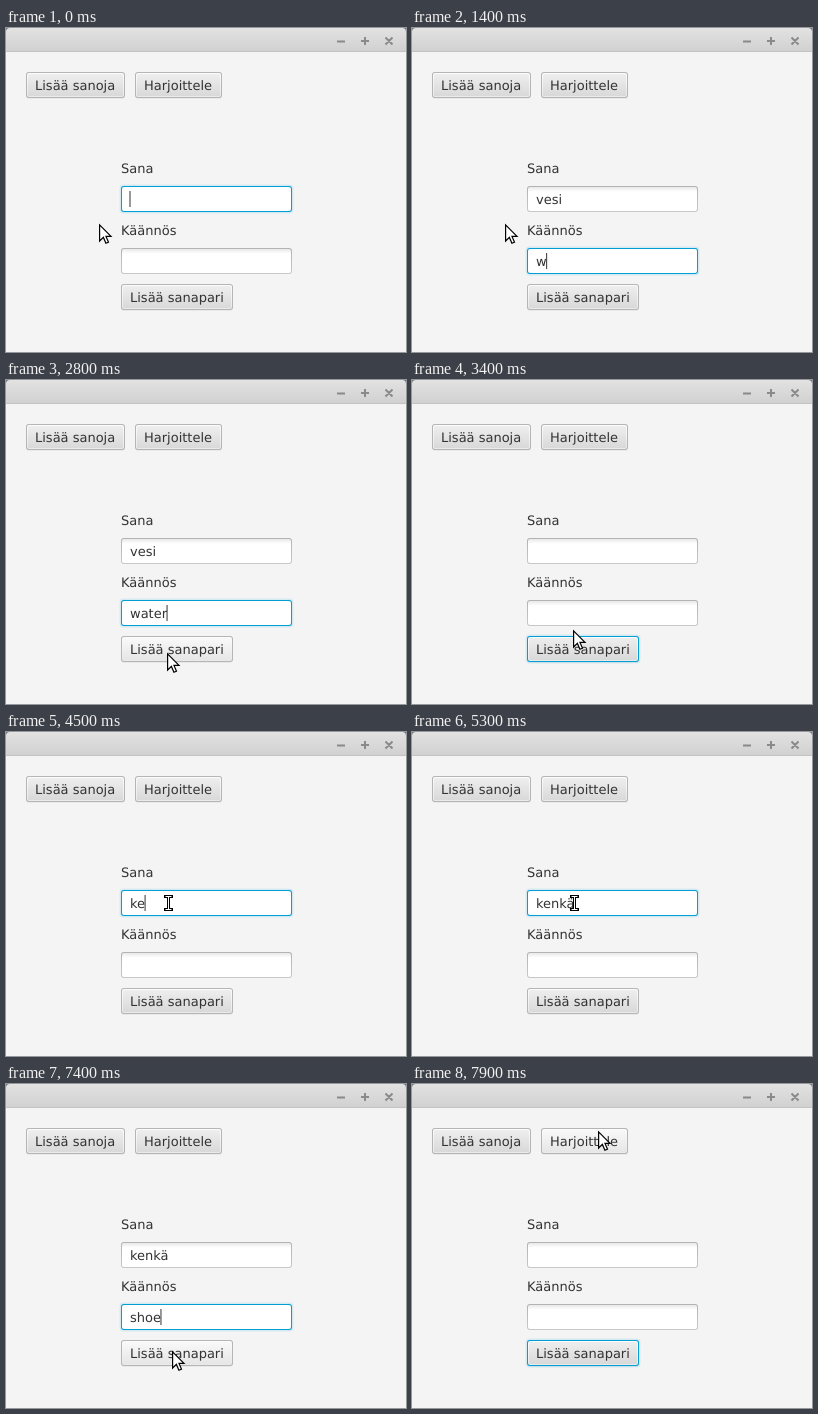
Recreate the animation shown at these times as an HTML page. Size 400 by 324 pixels, loop 8 s.

```html
<!DOCTYPE html>
<html lang="fi">
<head>
<meta charset="utf-8">
<title>Sanasto</title>
<style>
  html, body { margin: 0; width: 400px; height: 324px; overflow: hidden; background: #f4f4f4; }
  svg { display: block; }
  text { font: 13px "DejaVu Sans", sans-serif; fill: #333; text-rendering: geometricPrecision; white-space: pre; }
</style>
</head>
<body>
<svg id="stage" width="400" height="324" viewBox="0 0 400 324">
  <defs>
    <linearGradient id="bar" x2="0" y2="1"><stop stop-color="#e2e2e2"/><stop offset="1" stop-color="#d0d0d0"/></linearGradient>
    <linearGradient id="normal" x2="0" y2="1"><stop stop-color="#eee"/><stop offset="1" stop-color="#d9d9d9"/></linearGradient>
    <linearGradient id="hover" x2="0" y2="1"><stop stop-color="#f9f9f9"/><stop offset="1" stop-color="#e6e6e6"/></linearGradient>
    <linearGradient id="pressed" x2="0" y2="1"><stop stop-color="#dfdfdf"/><stop offset="1" stop-color="#cbcbcb"/></linearGradient>
    <linearGradient id="rim" x2="0" y2="1"><stop stop-color="#fcfcfc"/><stop offset="1" stop-color="#e9e9e9"/></linearGradient>
    <linearGradient id="edge" x2="0" y2="1"><stop stop-color="#b2b2b2"/><stop offset="1" stop-color="#c8c8c8"/></linearGradient>
    <linearGradient id="well" x2="0" y2="1"><stop stop-color="#e9e9e9"/><stop offset=".2" stop-color="#fff"/></linearGradient>
  </defs>
  <rect width="400" height="324" fill="#f4f4f4"/>
  <rect width="400" height="8" fill="#777"/>
  <path d="M0 24V4Q0 0 4 0H396Q400 0 400 4V24Z" fill="url(#bar)"/>
  <path d="M0 23.5H400" stroke="#c3c3c3"/>
  <path d="M331 13.5h8M355 13h8M359 9v8M379.5 9.5l7 7M386.5 9.5l-7 7" stroke="#8a8a8a" stroke-width="2"/>
</svg>
<script>
const stage = document.getElementById('stage');
const FOCUS = '#039ed3';
const LOOP = 8000;

function add(tag, attrs, parent = stage) {
  const el = document.createElementNS('http://www.w3.org/2000/svg', tag);
  set(el, attrs);
  parent.append(el);
  return el;
}

function set(el, attrs) {
  for (const name in attrs) el.setAttribute(name, attrs[name]);
}

function label(x, y, str) {
  const el = add('text', { x, y });
  el.textContent = str;
  return el;
}

// A rounded layer, inset from the control's bounds.
function layer({ x, y, w, h }, inset, rx, fill) {
  return add('rect', { x: x + inset, y: y + inset, width: w - 2 * inset, height: h - 2 * inset, rx, fill });
}

const inside = ({ x, y, w, h }, [px, py]) => px >= x && px < x + w && py >= y && py < y + h;

function button(x, y, w, str) {
  const box = { x, y, w, h: 26 };
  add('rect', { x, y: y + 1, width: w, height: 26, rx: 3, fill: '#e9e9e9' });
  const glow = layer(box, -1.4, 4, FOCUS);
  const edge = layer(box, 0, 3, '#b5b5b5');
  layer(box, 1, 2, 'url(#rim)');
  const body = layer(box, 2, 1.5, 'url(#normal)');
  label(x + 9, y + 18, str);
  return {
    draw(focused, at, down) {
      const over = inside(box, at);
      set(glow, { opacity: focused ? 0.13 : 0 });
      set(edge, { fill: focused ? FOCUS : '#b5b5b5' });
      set(body, { fill: `url(#${over ? (down ? 'pressed' : 'hover') : 'normal'})` });
    }
  };
}

function field(x, y) {
  const box = { x, y, w: 171, h: 26 };
  const glow = layer(box, -1.4, 4, FOCUS);
  const edge = layer(box, 0, 3, 'url(#edge)');
  const well = layer(box, 1, 2, 'url(#well)');
  const text = label(x + 9, y + 18, '');
  const caret = add('path', { stroke: '#333' });
  return {
    box,
    draw(str, focused, blink) {
      set(glow, { opacity: focused ? 0.13 : 0 });
      set(edge, { fill: focused ? FOCUS : 'url(#edge)' });
      set(well, { fill: focused ? '#fff' : 'url(#well)' });
      if (text.textContent !== str) text.textContent = str;
      const end = x + 9 + (str ? text.getComputedTextLength() : 0);
      set(caret, { d: `M${end} ${y + 5}v16`, opacity: focused && blink ? 1 : 0 });
    }
  };
}

const addWords = button(20, 44, 99, 'Lisää sanoja');
const practise = button(129, 44, 87, 'Harjoittele');
label(115, 145, 'Sana');
const word = field(115, 158);
label(115, 207, 'Käännös');
const meaning = field(115, 220);
const save = button(115, 256, 112, 'Lisää sanapari');

const arrow = add('path', {
  d: 'M.6 .9V17L4.4 13.4 6.9 19.3 9.5 18.2 7 12.4H12Z',
  fill: '#fff', stroke: '#000', 'stroke-width': 1.2
});
const beam = add('g', {});
const beamPath = 'M-3 -6.5H3M-3 6.5H3M0 -6.5V6.5';
add('path', { d: beamPath, stroke: '#000', 'stroke-width': 3, 'stroke-linecap': 'square' }, beam);
add('path', { d: beamPath, stroke: '#fff', 'stroke-width': 1 }, beam);

// Each step changes part of the state; "key" restarts the caret blink.
const steps = [];
const step = (t, change) => steps.push({ t, change });
const type = (name, str, times) =>
  times.forEach((t, i) => step(t, { [name]: str.slice(0, i + 1), key: t }));
const focus = (t, name) => step(t, { focus: name, key: t });
const move = (t, ...points) => points.forEach((at, i) => step(t + i * 100, { at }));

type('word', 'vesi', [400, 500, 600, 900]);
focus(1100, 'meaning');
type('meaning', 'water', [1400, 1500, 1600, 1700, 1800]);
move(1900, [152, 203], [225, 190], [267, 178]);
move(2300, [235, 250], [195, 291]);
move(2600, [178, 284], [165, 276], [161, 273]);
step(3100, { focus: 'save', down: true });
step(3200, { word: '', meaning: '', down: false });
move(3300, [161, 265], [161, 250], [162, 229], [162, 203], [162.5, 171]);
focus(3800, 'word');
type('word', 'kenkä', [4400, 4500, 5000, 5200, 5300]);
focus(5500, 'meaning');
type('meaning', 'shoe', [5800, 6000, 6100, 6400]);
move(6700, [168, 205], [176, 296], [182, 306]);
move(7100, [171, 290], [166, 267]);
step(7600, { focus: 'save', down: true });
step(7700, { word: '', meaning: '', down: false });
move(7800, [177, 150], [186, 47]);

const start = { word: '', meaning: '', focus: 'word', key: -400, at: [93, 196], down: false };

function draw(t) {
  const s = { ...start };
  for (const { t: from, change } of steps) if (from <= t) Object.assign(s, change);

  const blink = Math.floor((t - s.key) / 500) % 2 === 0;
  word.draw(s.word, s.focus === 'word', blink);
  meaning.draw(s.meaning, s.focus === 'meaning', blink);
  addWords.draw(false, s.at, s.down);
  practise.draw(false, s.at, s.down);
  save.draw(s.focus === 'save', s.at, s.down);

  const typing = inside(word.box, s.at) || inside(meaning.box, s.at);
  const transform = `translate(${s.at})`;
  set(arrow, { transform, opacity: typing ? 0 : 1 });
  set(beam, { transform, opacity: typing ? 1 : 0 });
}

const origin = performance.now();
function tick() {
  draw((performance.now() - origin) % LOOP);
  requestAnimationFrame(tick);
}
tick();
</script>
</body>
</html>
```
